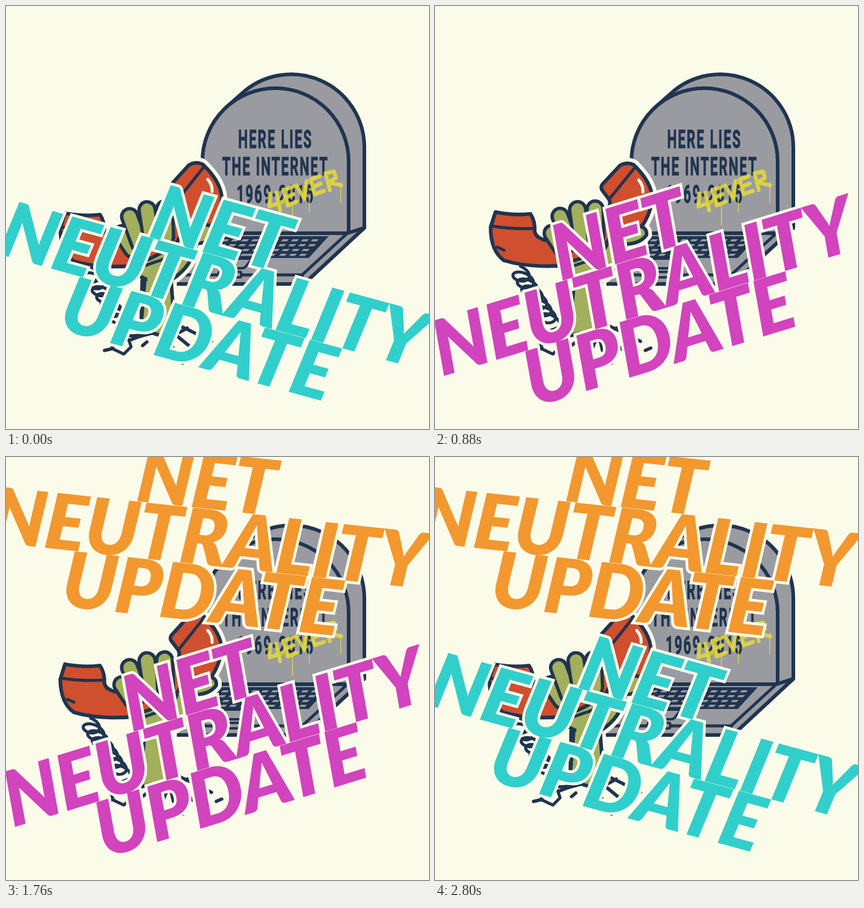
Recreate the animation shown at these times as an HTML page with a canvas. Size 700 by 700 pixels, loop 2960 ms.

```html
<!DOCTYPE html>
<html lang="en">
<head>
<meta charset="utf-8">
<title>Net Neutrality Update</title>
<style>
html, body { margin: 0; height: 100%; overflow: hidden; background: #fbfbea; }
canvas { display: block; }
</style>
</head>
<body>
<canvas id="stage" width="700" height="700"></canvas>
<script>
const ctx = document.getElementById('stage').getContext('2d');
const CREAM = '#fbfbea', NAVY = '#20344f', GREY = '#9a9ba1', RED = '#cf4f2f',
      GREEN = '#a2af5c', YELLOW = '#e3d93b';
const LOOP = 2960, STEP = 80;

// Slanted titles, keyed by the letter used in the schedule
const titles = {
  C: { color: '#31cfcb', x: 332, y: 505, angle: 15.3 },
  P: { color: '#d243be', x: 357, y: 507, angle: -17.1 },
  O: { color: '#f2982f', x: 330, y: 179, angle: 6.2 }
};
const titleLines = [['NET', -13, -93], ['NEUTRALITY', 0, 0], ['UPDATE', -1, 93]];

// Held states after the opening flicker
const holds = [[1280, 'C'], [1600, 'P'], [1760, 'PO'], [2000, 'CPO'], [2080, 'C'],
               [2400, 'CP'], [2480, 'P'], [2640, 'CPO'], [2800, 'CO']];

const phone = new Path2D('M100 341Q130 347 158 344Q166 356 165 374Q168 384 184 388C230 385 262 365 285 338Q292 328 288 320L276 304Q274 299 277 295L306 264Q318 257 329 263Q359 292 360 320C352 370 310 410 250 424C200 434 150 432 114 421Q92 405 92 366Z');
const phoneLines = new Path2D('M94 364Q130 370 165 368M288 320L331 267M103 399L114 404M165 374L169 382');
const arm = new Path2D('M231 450L274 450L280 544L268 536L258 546L242 541L222 546Z');
const palm = new Path2D('M209 428Q216 445 233 452L277 452Q309 432 317 394Q340 393 350 379Q352 364 330 363Q302 362 290 382Q283 397 268 404L240 418Z');
const palmLines = new Path2D('M216 434Q236 428 247 424Q275 418 285 395M226 453L223 544');
const fingers = new Path2D();
const fingerLines = [[194, 376, 211, 402], [207, 348, 223, 393], [236, 337, 243, 388], [265, 336, 266, 382]]
  .map(([x1, y1, x2, y2]) => new Path2D(`M${x1} ${y1}L${x2} ${y2}`));
fingerLines.forEach(f => fingers.addPath(f));

const cord = new Path2D();
for (let i = 0; i <= 240; i++) {
  const u = i / 240, a = -1.6 + u * Math.PI * 14.6;
  cord.lineTo(139 + 53 * u + 15 * Math.cos(a) - 3 * Math.sin(a),
              440 + 84 * u + 9 * Math.sin(a) + 5 * Math.cos(a));
}
cord.lineTo(183, 540);
cord.lineTo(188, 552);

const ground = new Path2D('M186 542L208 546L222 545M205 553L226 545M268 548L257 575M272 548L277 570M283 546L316 573M274 543L287 529L300 535L340 555M287 540L300 533M226 562L233 556M348 570L357 566M285 583L292 591M163 570L176 567');
const plug = new Path2D('M173 556L186 549L203 552L207 564L195 576L178 568Z');
const graffiti = new Path2D('M8 -26L0 -8L24 -8M18 -24L14 3M46 -24L30 -24L28 0L44 -1M29 -12L43 -13M52 -24L57 -1L70 -25M92 -25L77 -25L75 -2L91 -2M76 -13L90 -14M100 0L103 -26L117 -24L116 -14L102 -12L120 -1');
const drips = new Path2D('M474 330V362M502 318V341M554 292V325');

function stroke(path, color, width) {
  ctx.strokeStyle = color;
  ctx.lineWidth = width;
  ctx.stroke(path);
}

function shape(path, fill, width = 6) {
  ctx.fillStyle = fill;
  ctx.fill(path);
  stroke(path, NAVY, width);
}

function drawStone() {
  shape(new Path2D('M364 168L390 145A121 121 0 0 1 593 233V367L567 390H446V257Z'), GREY);
  shape(new Path2D('M325 376V257A121 121 0 0 1 567 257V376Z'), GREY);
  stroke(new Path2D('M567 376V390'), NAVY, 6);

  // Condensed lettering
  ctx.save();
  ctx.font = '700 42px Roboto, sans-serif';
  ctx.letterSpacing = '3.8px';
  ctx.textAlign = 'center';
  ctx.fillStyle = ctx.strokeStyle = NAVY;
  ctx.lineWidth = 1;
  ctx.translate(446, 0);
  ctx.scale(0.53, 1);
  [['HERE LIES', 235], ['THE INTERNET', 280], ['1969-2015', 326]].forEach(([text, y]) => {
    ctx.fillText(text, 0, y);
    ctx.strokeText(text, 0, y);
  });
  ctx.restore();

  ctx.save();
  ctx.globalAlpha = 0.88;
  stroke(drips, YELLOW, 1.5);
  ctx.translate(439, 340);
  ctx.rotate(-20 * Math.PI / 180);
  ctx.scale(1.03, 1.1);
  stroke(graffiti, YELLOW, 6);
  ctx.restore();
}

function drawKeyboard() {
  shape(new Path2D('M330 376H565L593 367L493 460H270V445Z'), GREY);
  stroke(new Path2D('M330 376H565L490 445H270M490 445L491 459'), NAVY, 5);
  ctx.fillStyle = NAVY;
  ctx.fill(new Path2D('M357 381H534L501 417H322Z'));
  ctx.save();
  ctx.transform(1, 0, -0.95, 1, 357, 382);
  ctx.fillStyle = GREY;
  for (let row = 0; row < 4; row++) {
    for (let col = 0; col < 10; col++) {
      if (row === 3 && col > 2 && col < 7) continue;
      ctx.fillRect(6 + col * 16.5 + (row % 2) * 3, 4 + row * 8, 10, 3.6);
    }
    if (row === 3) ctx.fillRect(60, 28, 56, 3.6);
  }
  ctx.restore();
  shape(new Path2D('M366 418H402Q407 418 404 422L396 432Q394 434 390 434H353Q348 434 351 430L360 420Q362 418 366 418Z'), GREY, 4);
  shape(new Path2D('M355 440H387Q389 440 389 442V447Q389 449 387 449H355Q352 449 352 447V442Q352 440 355 440Z'), GREY, 4);
  ctx.fillStyle = NAVY;
  ctx.fillRect(487, 447, 5, 5);
}

function drawHand(tilted) {
  ctx.save();
  if (tilted) {
    ctx.translate(250, 545);
    ctx.rotate(-0.7 * Math.PI / 180);
    ctx.translate(-250, -545);
  }
  [phone, palm, arm].forEach(p => stroke(p, CREAM, 18));
  stroke(fingers, CREAM, 42);
  stroke(cord, NAVY, 5);
  shape(arm, GREEN);
  shape(phone, RED);
  stroke(phoneLines, NAVY, 5);
  stroke(new Path2D('M337 288Q345 297 344 308'), CREAM, 5);
  shape(palm, GREEN);
  // The wrist stays open between palm and arm
  ctx.fillStyle = GREEN;
  ctx.fillRect(235, 444, 37, 14);
  stroke(palmLines, NAVY, 5);
  fingerLines.forEach(f => {
    stroke(f, NAVY, 32);
    stroke(f, GREEN, 21);
  });
  ctx.restore();
  stroke(ground, NAVY, 5.5);
  shape(plug, CREAM, 5);
}

function drawTitle({ color, x, y, angle }) {
  ctx.save();
  ctx.translate(x, y);
  ctx.rotate(angle * Math.PI / 180);
  ctx.font = 'italic 900 127px Lato, sans-serif';
  ctx.letterSpacing = '-1.2px';
  ctx.textAlign = 'center';
  ctx.lineJoin = 'miter';
  ctx.miterLimit = 3;
  ctx.lineWidth = 9;
  ctx.strokeStyle = CREAM;
  ctx.fillStyle = color;
  titleLines.forEach(line => ctx.strokeText(...line));
  titleLines.forEach(line => ctx.fillText(...line));
  ctx.restore();
}

function draw(now) {
  const t = now % LOOP, step = Math.floor(t / STEP);
  const flicker = t < holds[0][0], odd = step % 2 === 1;
  const visible = flicker
    ? (odd ? (step < 8 ? 'O' : 'P') : 'C')
    : holds.filter(([start]) => start <= t).pop()[1];

  ctx.fillStyle = CREAM;
  ctx.fillRect(0, 0, 700, 700);
  ctx.lineJoin = ctx.lineCap = 'round';
  drawStone();
  drawKeyboard();
  drawHand(!(flicker && odd));
  [...visible].forEach(key => drawTitle(titles[key]));
}

const start = performance.now();
function tick() {
  draw(performance.now() - start);
  requestAnimationFrame(tick);
}
tick();
</script>
</body>
</html>
```
